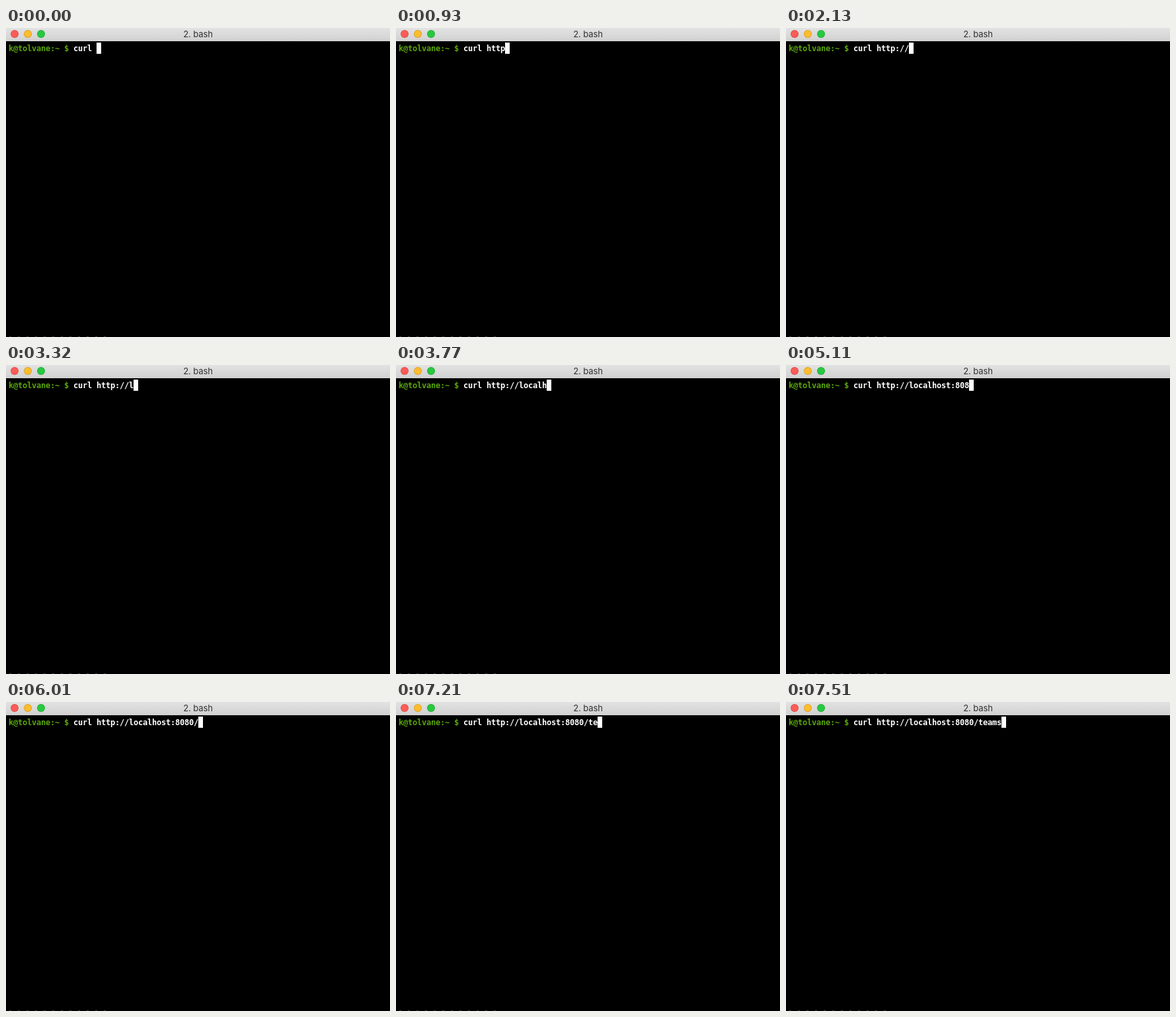
These frames come from a looping animation (581 by 467 pixels, 8000 ms). An HTML page:

```html
<!DOCTYPE html>
<html lang="en">
<head>
<meta charset="utf-8">
<title>Terminal</title>
<style>
  html, body { margin: 0; width: 100%; height: 100%; overflow: hidden; background: #000; }
  .stage { position: relative; width: 581px; height: 467px; overflow: hidden; background: #000; }
  .bar {
    position: absolute; inset: 0 0 auto; height: 20px;
    background: linear-gradient(#e2e2e2, #d1d1d1);
    font: 13px/19px Inter, Roboto, sans-serif; letter-spacing: -.1px;
    color: #303030; text-align: center;
  }
  .light {
    position: absolute; top: 3px; width: 12px; height: 12px;
    box-sizing: border-box; border: 1px solid #0002; border-radius: 50%;
  }
  .close { left: 7px; background: #fc5b57; }
  .shrink { left: 27px; background: #fdbc2e; }
  .grow { left: 47px; background: #27c940; }
  /* every character sits in a 7px cell */
  .line {
    position: absolute; left: 4px; top: 22px; white-space: pre; color: #fff;
    font: bold 12px/18px "DejaVu Sans Mono", monospace;
    letter-spacing: calc(7px - 1ch); font-variant-ligatures: none;
  }
  .prompt { color: #59a50d; }
  .cursor { position: absolute; left: 137px; top: 22px; width: 7px; height: 17px; background: #fff; }
  /* tops of a row cut off by the window edge */
  .next {
    position: absolute; left: 5px; top: 466px; width: 146px; height: 1px;
    background: repeating-linear-gradient(90deg, #4a3c40 0 3px, #0000 3px 13px);
  }
</style>
</head>
<body>
<div class="stage">
  <div class="bar">
    <i class="light close"></i><i class="light shrink"></i><i class="light grow"></i>
    2. bash
  </div>
  <div class="line"><span class="prompt">k@tolvane:~ $</span> curl <span id="typed"></span></div>
  <div class="cursor" id="cursor"></div>
  <div class="next"></div>
</div>
<script>
  const LOOP = 8000, CELL = 7;
  const TICK = 150;   // screen refresh in ms
  const RATE = 1.6;   // characters per refresh
  // Typing comes in bursts; lead is how far a burst has got at its first refresh.
  const bursts = [
    { at: 615, text: "http", lead: 1.6 },
    { at: 1530, text: ":", lead: 1.4 },
    { at: 2130, text: "//", lead: 1.6 },
    { at: 3320, text: "localhost:", lead: 1.4 },
    { at: 4960, text: "8080", lead: 1.4 },
    { at: 6010, text: "/", lead: 1.4 },
    { at: 7210, text: "teams", lead: 1.6 }
  ];
  const typed = document.getElementById("typed");
  const cursor = document.getElementById("cursor");
  const start = performance.now();

  function typedPart({ at, text, lead }, t) {
    if (t < at) return "";
    const ticks = Math.floor((t - at) / TICK);
    return text.slice(0, Math.round(lead + RATE * ticks));
  }

  function draw() {
    const t = (performance.now() - start) % LOOP;
    const text = bursts.map(burst => typedPart(burst, t)).join("");
    typed.textContent = text;
    cursor.style.transform = `translateX(${text.length * CELL}px)`;
    requestAnimationFrame(draw);
  }
  draw();
</script>
</body>
</html>
```
